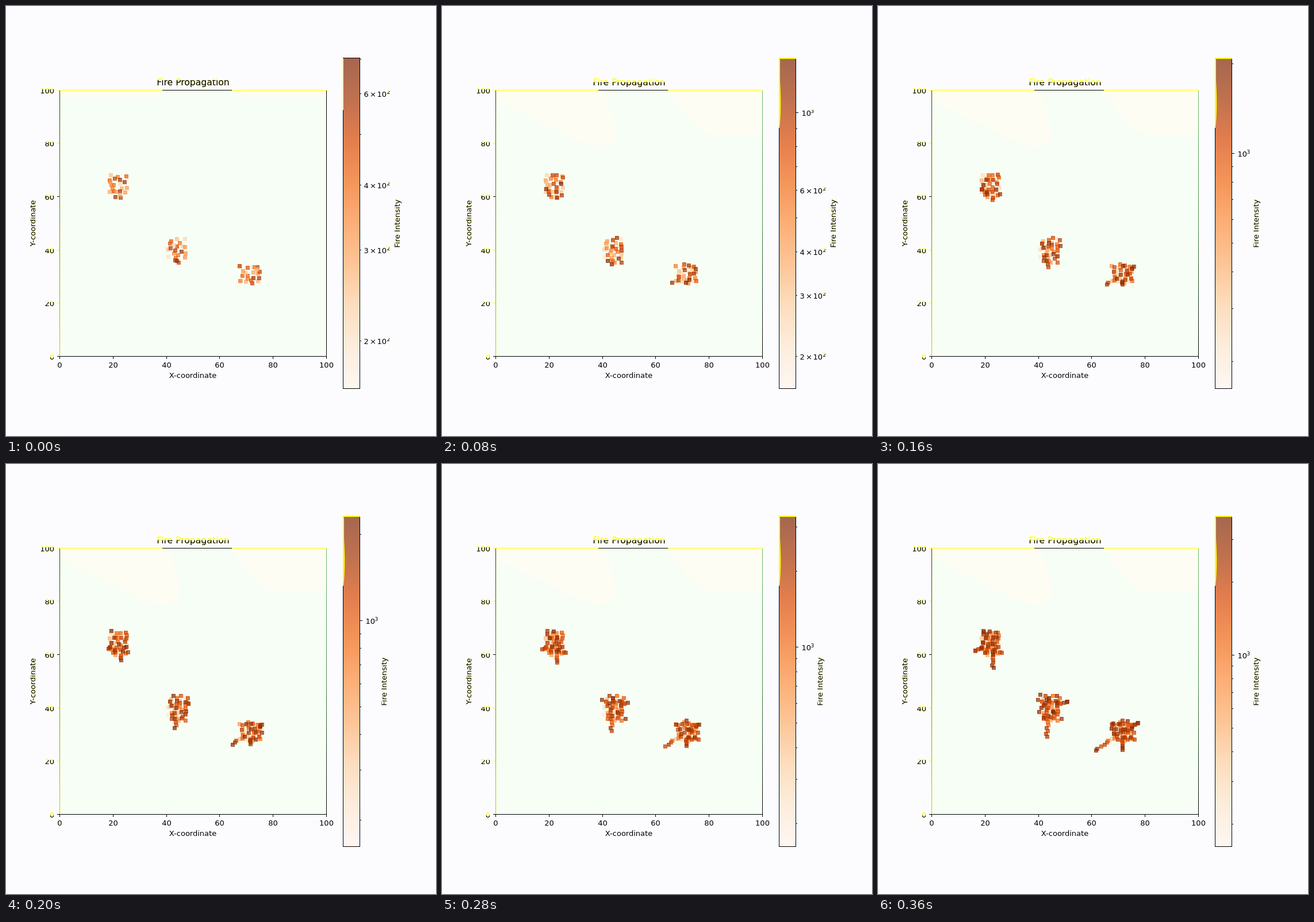
An HTML page with a canvas that plays this animation: 748 px wide and 748 px high, repeating every 0.4 s.

```html
<!DOCTYPE html>
<html lang="en">
<head>
<meta charset="utf-8">
<title>Fire Propagation</title>
<style>
  html, body { margin: 0; width: 100%; height: 100%; overflow: hidden; background: #fcfcff; }
  canvas { display: block; }
</style>
</head>
<body>
<canvas id="stage" width="748" height="748"></canvas>
<script>
const ctx = document.getElementById('stage').getContext('2d');
const STEP = 40, STEPS = 10;
const INK = '#000', GLOW = '#ffff00', CREAM = '#fefdf3';
const LOW = 162;
const peaks = [701, 1086, 1430, 1848, 2080, 2311, 2894, 3300, 3732, 3732];
const palette = ['#fff5eb', '#fee6ce', '#fdd0a2', '#fdae6b', '#fd8d3c', '#f16913', '#d94801', '#a63603', '#7f2704'];
const bar = { left: 587, right: 615, top: 91, bottom: 665 };

// Each fire fills a box and reaches out towards a few tips
const fires = [
  { x: 196, y: 311, w: 33, h: 43, tips: [[201, 354], [169, 325]] },
  { x: 299, y: 423, w: 37, h: 43, tips: [[294, 474], [329, 413]] },
  { x: 426, y: 464, w: 39, h: 34, tips: [[379, 498], [452, 450], [425, 497]] }
];

let seed = 7;
function random() {
  seed = (seed * 16807) % 2147483647;
  return seed / 2147483647;
}
const jitter = size => (random() - 0.5) * size;

const cells = [];
function ignite(x, y, born) {
  const heat = born ? peaks[born] * (0.6 + 0.4 * random()) : LOW * (peaks[0] / LOW) ** (0.15 + 0.8 * random());
  cells.push({ x: Math.round(x), y: Math.round(y), born, heat });
}
for (const { x, y, w, h, tips } of fires) {
  let n = 0;
  for (let born = 0; born < STEPS; born++) {
    // Low-discrepancy steps spread the cells evenly over the box
    for (let i = born ? 5 : 20; i > 0; i--) {
      n++;
      const u = n * 0.7549 % 1 - 0.5, v = n * 0.5698 % 1 - 0.5;
      ignite(x + u * w + jitter(7), y + v * h + jitter(7), born);
    }
    if (born % 3) continue;
    const reach = 0.4 + 0.6 * born / (STEPS - 1);
    for (const [tx, ty] of tips) {
      ignite(x + (tx - x) * reach, y + (ty - y) * reach, born);
      if (born) ignite(x + (tx - x) * (reach - 0.1) + jitter(6), y + (ty - y) * (reach - 0.1), born - 1);
    }
  }
}
cells.sort((a, b) => a.born - b.born);

function heatColor(level) {
  const p = Math.max(0, Math.min(1, level)) * (palette.length - 1);
  const i = Math.min(Math.floor(p), palette.length - 2);
  const channel = (hex, c) => parseInt(hex.slice(1 + 2 * c, 3 + 2 * c), 16);
  const mix = [0, 1, 2].map(c => {
    const a = channel(palette[i], c);
    return Math.round(a + (channel(palette[i + 1], c) - a) * (p - i));
  });
  return `rgb(${mix})`;
}

function rect(color, x, y, w, h) {
  ctx.fillStyle = color;
  ctx.fillRect(x, y, w, h);
}

function shape(color, path) {
  ctx.fillStyle = color;
  ctx.fill(new Path2D(path));
}

function gradient(y0, y1, colors) {
  const g = ctx.createLinearGradient(0, y0, 0, y1);
  colors.forEach((c, i) => g.addColorStop(i / (colors.length - 1), c));
  return g;
}

// Text whose part higher than `cut` above the baseline shines yellow
function label(str, x, y, { size = 13, align = 'left', cut = 99, turn = 0 } = {}) {
  ctx.save();
  ctx.translate(x, y);
  ctx.rotate(turn);
  ctx.font = `${size}px "DejaVu Sans", sans-serif`;
  ctx.textAlign = align;
  ctx.fillStyle = GLOW;
  if (cut < 99) ctx.fillText(str, 0, 0);
  ctx.beginPath();
  ctx.rect(-200, -cut, 400, cut + 20);
  ctx.clip();
  ctx.fillStyle = INK;
  ctx.fillText(str, 0, 0);
  ctx.restore();
}

function drawCells(k) {
  const range = Math.log(peaks[k] / LOW);
  ctx.globalAlpha = 0.7;
  ctx.lineWidth = 1;
  for (const { x, y, born, heat } of cells) {
    if (born > k) break;
    const color = heatColor(Math.log(heat / LOW) / range);
    rect(color, x - 3, y - 3, 6, 6);
    ctx.strokeStyle = color;
    ctx.strokeRect(x - 2.5, y - 2.5, 6, 6);
  }
  ctx.globalAlpha = 1;
}

function drawPlot(k) {
  rect('#f7fef5', 94, 147, 463, 463);
  if (k) {
    shape(CREAM, 'M94 147H280Q297 180 303 228Q297 242 273 245L240 236L94 164Z');
    shape(CREAM, 'M393 147H557V223H470Q440 222 393 147Z');
  } else {
    rect(CREAM, 94, 147, 176, 13);
    rect(CREAM, 410, 147, 147, 13);
  }
  drawCells(k);

  rect(GLOW, 93, 146, 465, 1);
  rect(INK, 272, 146, 121, 1);
  rect(gradient(147, 610, ['#333300', '#cccc00']), 93, 147, 1, 463);
  rect(k ? gradient(147, 610, ['#6fbf6f', '#4a8a4a', INK]) : INK, 557, 147, 1, 463);
  rect(INK, 93, 609, 465, 1);

  for (let v = 0; v <= 100; v += 20) {
    const x = 93 + Math.round(v * 4.638), y = 609 - Math.round(v * 4.634);
    rect(INK, x, 610, 1, 4);
    label(v, x + 0.5, 629, { align: 'center' });
    rect(v % 60 ? GLOW : INK, 89, y, 4, 1);
    label(v, 84, y + 5.5, { align: 'right', cut: v ? 6.5 : 3 });
  }
  label('X-coordinate', 325, 647, { align: 'center' });
  label('Y-coordinate', 50.5, 378, { align: 'center', turn: -Math.PI / 2, cut: 8.5 });
  label('Fire Propagation', 325.5, 138, { size: 15.6, align: 'center', cut: k ? 5.5 : 9 });
}

function drawBar(k) {
  const { left, right, top, bottom } = bar, w = right - left, h = bottom - top;
  ctx.globalAlpha = 0.7;
  rect(gradient(bottom, top, palette), left, top, w, h);
  ctx.globalAlpha = 1;
  ctx.strokeStyle = INK;
  ctx.strokeRect(left - 0.5, top - 0.5, w + 1, h + 1);
  rect(GLOW, left - 1, top, 1, 90);
  if (k) {
    rect(GLOW, left - 1, top - 1, w + 2, 2);
    shape(GLOW, 'M586 91L588 93V130Q591 180 587 212H586Z');
  }

  const range = Math.log(peaks[k] / LOW);
  const detailed = peaks[k] / LOW < 10;
  for (const decade of [100, 1000]) {
    for (let m = 1; m < 10; m++) {
      const value = m * decade;
      if (value < LOW || value > peaks[k]) continue;
      const y = Math.round(bottom - h * Math.log(value / LOW) / range);
      rect(INK, right + 1, y, m === 1 ? 4 : 2, 1);
      if (m === 1) {
        label('10', 625.5, y + 6);
        label('3', 641.5, y + 1, { size: 9, cut: detailed ? 5 : 99 });
      } else if (detailed && [2, 3, 4, 6].includes(m)) {
        label(m, 622.5, y + 5.5);
        label('×', 633, y + 5.5);
        label('10', 645.5, y + 5.5);
        label('2', 662.5, y + 0.5, { size: 9, cut: 4.5 });
      }
    }
  }
  label('Fire Intensity', detailed ? 684.5 : 662, 378.5, { align: 'center', turn: -Math.PI / 2, cut: 8.5 });
}

const begin = performance.now();
function draw(now) {
  const k = Math.floor(Math.max(0, now - begin) / STEP) % STEPS;
  rect('#fcfcff', 0, 0, 748, 748);
  drawPlot(k);
  drawBar(k);
  requestAnimationFrame(draw);
}
draw(begin);
</script>
</body>
</html>
```
